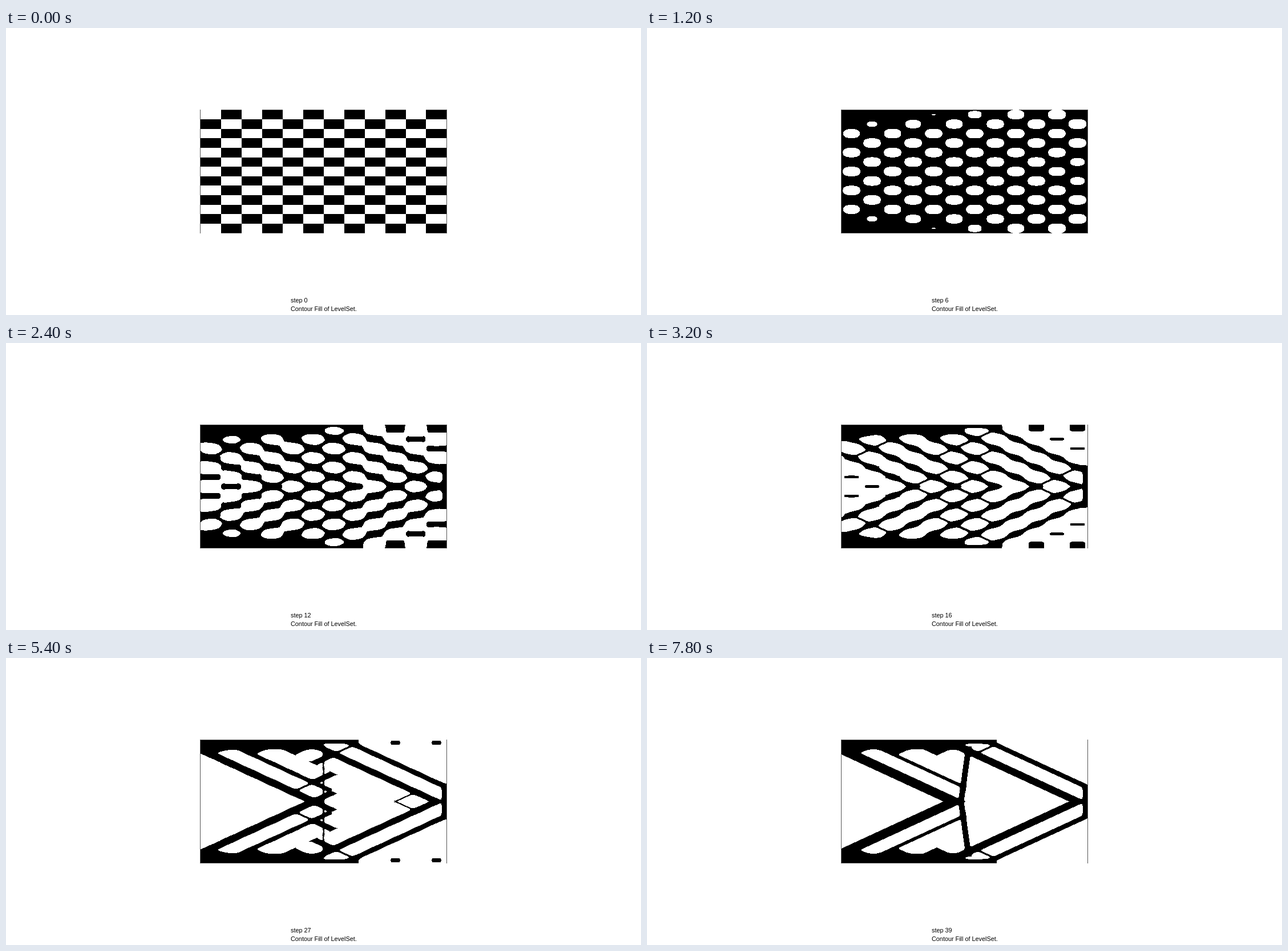
An HTML page with a canvas for the animation above (8 s loop, 1113 by 503 pixels).

```html
<!DOCTYPE html>
<html>
<head>
<meta charset="utf-8">
<title>Contour Fill of LevelSet</title>
<style>
html, body { margin: 0; width: 1113px; height: 503px; overflow: hidden; background: #fff; }
canvas { position: absolute; left: 340px; top: 143px; }
svg { position: absolute; left: 0; top: 0; }
text { font: 10.85px "Liberation Sans", Arial, sans-serif; fill: #000; }
</style>
</head>
<body>
<canvas id="view" width="433" height="217"></canvas>
<svg width="1113" height="503">
  <text id="label" x="499" y="481">step 0</text>
  <text x="499" y="495.5">Contour Fill of LevelSet.</text>
</svg>
<script>
const W = 433, H = 217, MID = 108;
const STEP_MS = 200, STEPS = 40;
const CELL_W = 36, CELL_H = 216 / 13;
const DIAG = 1 / Math.hypot(1 / CELL_W, 1 / CELL_H); // pixels per lattice unit across a diagonal
const INK = 0xff000000, PAPER = 0xffffffff, RIM = 0xff555555;

const { PI, abs, exp, floor, hypot, max, min, round, sin, cos } = Math;
const clamp = (v, a, b) => max(a, min(b, v));
const mix = (a, b, u) => a + (b - a) * u;
const ramp = (s, a, b) => clamp((s - a) / (b - a), 0, 1);

// Union with a small fillet where two parts meet.
function join(a, b, r = 4) {
  const h = max(0, r - abs(a - b));
  return max(a, b) + h * h / (4 * r);
}

const lens = (dx, dy, rx, ry, p) =>
  (1 - (abs(dx / rx) ** p + abs(dy / ry) ** p) ** (1 / p)) * min(rx, ry);

// All fields below are in pixels, positive inside the material.
// They cover the upper half; the lower half is its reflection.

const checker = (x, y) => -8 * sin(PI * x / CELL_W) * sin(PI * y / CELL_H);

// Hole widths shrink towards the clamped upper left corner and the load on the right.
function holeWidth(i, j, u) {
  const reach = i / 2 + 2 * j - mix(1.4, 2.1, u);
  if (reach <= 0) return 0;
  const load = exp(-((11.5 - i) ** 2) - (6 - j) ** 2);
  return mix(25, 34, u) * (1 - exp(-reach * mix(0.9, 1.6, u)))
    - 18 * load + 0.5 * u * max(0, i - 2 * j - 6);
}

function perforated(step) {
  const u = ramp(step, 3, 8), p = mix(2.2, 2.8, u);
  const width = Array.from({ length: 12 }, (_, i) =>
    Array.from({ length: 7 }, (_, j) => (i + j) % 2 ? 0 : holeWidth(i, j, u)));
  return (x, y) => {
    const ci = floor(x / CELL_W), cj = floor(y / CELL_H);
    let hole = -8;
    for (let i = max(0, ci - 1); i <= min(11, ci + 1); i++)
      for (let j = max(0, cj - 1); j <= min(6, cj + 1); j++) {
        const w = width[i][j];
        if (w < 5) continue;
        const dx = x - (i + 0.5) * CELL_W, dy = y - (j + 0.5) * CELL_H;
        hole = max(hole, lens(dx, dy, w / 2, 0.31 * w - 1, p));
      }
    return -hole;
  };
}

// Last step of each wall across a channel, by channel and column.
const walls = {
  '-2': { 1: 20, 4: 20 },
  0: { 2: 25, 5: 35, 6: 31 },
  2: { 5: 20, 6: 31, 7: 24 },
  4: { 6: 31, 7: 26, 10: 29 },
  6: { 7: 99, 11: 27 }
};

// Diagonal struts between the channels, with walls, top slab, post and load block.
function truss(step) {
  const age = step - 16, t = age / 23;
  const half = {
    '-3': 4.4 - age * 1.2,
    '-1': 4.6 + 3.4 * t,
    1: 4.6 - 1.8 * t,
    3: 4.6 - 0.45 * age,
    5: 4.6 + 1.6 * t,
    7: 4.5 - 0.4 * t
  };
  const wave = 1.6 * exp(-age / 6);
  const spurEnd = 212 + 73 * exp(-age / 8);
  const postHalf = mix(-6, 5, ramp(step, 20, 31)), tilt = 0.14 * ramp(step, 30, 39);
  const lastLens = { '-5': 20, '-3': 26, 9: 20, 11: 20 };
  const rimLens = 1 - (age / 17) ** 2;

  return (x, y) => {
    const X = x / CELL_W, Y = y / CELL_H, d = X - Y, a = X + Y;
    const strut = 2 * floor(d / 2) + 1, channel = 2 * round(d / 2), joint = 2 * round(a / 2);
    let m = -8;

    if (strut in half) {
      let bar = half[strut] + wave * cos(PI * a) - abs(d - strut) * DIAG;
      if (strut === 1) bar = min(bar, (spurEnd - x) / 2);
      m = max(m, bar);
    }

    const column = (joint + channel) / 2, last = walls[channel]?.[column] ?? 0;
    if (step < last) {
      const thick = (column === 6 ? 2 + age / 4 : 1.6) * min(1, (last - step) / 3);
      m = join(m, thick - abs(a - joint) * DIAG);
    }
    if (channel <= 6) m = join(m, (min(channel + 2, 6) - a) * DIAG + 1.5 + 3 * t);

    const slab = 16.5 + (12 - age / 2) * exp(-((x / 40) ** 2));
    m = join(m, min(slab - y, 216 - x));
    m = join(m, min(6 + t - y, mix(282, 272, t) - x));
    m = join(m, min(postHalf - abs(x - 216 - (65 - y) * tilt), y - 12));
    m = join(m, min(x - 423, mix(37, 24, t) - (MID - y)));

    // Dissolved struts leave thin remains in the middle of their cells.
    const i = floor(X), j = floor(Y), k = i - j;
    if (k in lastLens) {
      const rim = j === 0;
      const ry = rim ? 6.5 * rimLens : min(2.5, 0.6 * (lastLens[k] - step));
      const rx = rim ? 14 * rimLens : 13;
      const cy = rim ? 5 : (j + 0.5) * CELL_H;
      if (ry > 0) m = max(m, lens(x - (i + 0.5) * CELL_W, y - cy, rx, ry, 4));
    }
    return m;
  };
}

function blend(f, g, u) {
  return (x, y) => mix(clamp(f(x, y), -8, 8), clamp(g(x, y), -8, 8), u);
}

function shape(step) {
  if (step < 3) return blend(checker, perforated(3), step / 3);
  if (step <= 8) return perforated(step);
  if (step < 16) return blend(perforated(8), truss(16), ramp(step, 8, 16));
  return truss(step);
}

const view = document.getElementById('view').getContext('2d');
const label = document.getElementById('label');
const image = view.createImageData(W, H);
const pixels = new Uint32Array(image.data.buffer);
let shown = -1;

function render(step) {
  const material = shape(step);
  for (let y = 0; y <= MID; y++)
    for (let x = 0; x < W; x++) {
      const side = x === 0 || x === W - 1;
      const solid = material(x, max(y, 0.5)) > 0;
      const color = side || solid && y === 0 ? RIM : solid ? INK : PAPER;
      pixels[y * W + x] = pixels[(H - 1 - y) * W + x] = color;
    }
  view.putImageData(image, 0, 0);
  label.textContent = 'step ' + step;
}

function tick() {
  const step = floor(performance.now() / STEP_MS) % STEPS;
  if (step !== shown) render(shown = step);
  requestAnimationFrame(tick);
}
tick();
</script>
</body>
</html>
```
